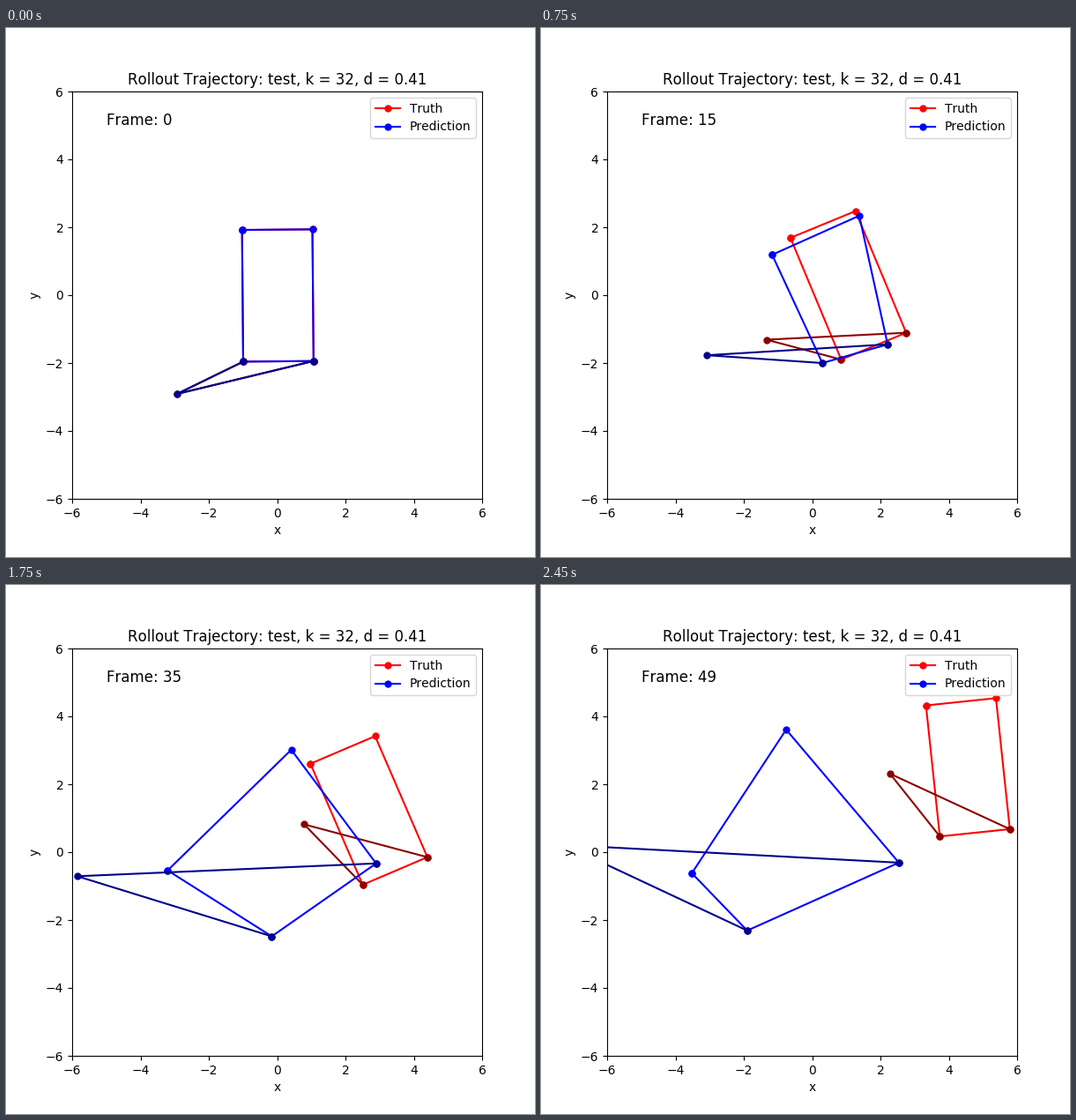
Recreate the animation shown at these times as a matplotlib script. Size 600 px wide and 600 px high, loop 2.5 s.

```python
import numpy as np
import matplotlib.pyplot as plt
from matplotlib.animation import FuncAnimation

plt.rcParams["text.kerning_factor"] = 6

FRAMES = 50
INTERVAL = 50
STEPS = np.arange(FRAMES)
KEYS = np.array([0, 6, 15, 31, 49])

# Joints: top left, top right, bottom right, bottom left, arm tip
BODY = [0, 1, 2, 3, 0]
ARM = [3, 4, 2]
CORNERS = np.array([-1 + 1j, 1 + 1j, 1 - 1j, -1 - 1j])
HALF_WIDTH, HALF_HEIGHT = 1.03, 1.94


def spline(values):
    """Natural cubic spline through complex values at the key steps."""
    def cubes(t):
        return abs(t[:, None] - KEYS) ** 3.0

    def line(t):
        return np.column_stack([np.ones(len(t)), t])

    system = np.block([[cubes(KEYS), line(KEYS)],
                       [line(KEYS).T, np.zeros((2, 2))]])
    weights = np.linalg.solve(system, np.append(values, [0, 0]))
    return np.hstack([cubes(STEPS), line(STEPS)]) @ weights


def truth_paths():
    """A rigid rectangle drifts and tilts while the arm tip moves straight."""
    center = spline([0.02 - 0.01j, 0.5 + 0.15j, 1.06 + 0.29j, 2.25 + 0.94j, 4.56 + 2.5j])
    tilt = np.radians(spline([0.5, 11.5, 22.5, 26, 6]).real)
    box = CORNERS.real * HALF_WIDTH + 1j * CORNERS.imag * HALF_HEIGHT
    body = center[:, None] + np.exp(1j * tilt)[:, None] * box
    tip = np.linspace(-2.93 - 2.91j, 2.28 + 2.31j, FRAMES)
    return np.column_stack([body, tip])


def prediction_paths(start):
    """Each joint leaves the shared start pose along its own curve."""
    later = [
        [-1.05 + 1.79j, -1.17 + 1.19j, -2.9 - 0.34j, -3.52 - 0.62j],
        [1.2 + 2.1j, 1.38 + 2.34j, 0.71 + 2.86j, -0.76 + 3.61j],
        [1.48 - 1.71j, 2.21 - 1.45j, 2.9 - 0.47j, 2.54 - 0.31j],
        [-0.53 - 1.7j, 0.3 - 2j, 0.19 - 2.47j, -1.9 - 2.31j],
        [-2.49 - 2.39j, -3.08 - 1.77j, -5.35 - 0.94j, -7.24 + 0.21j],
    ]
    return np.column_stack([spline([first, *rest])
                            for first, rest in zip(start, later)])


fig, ax = plt.subplots(figsize=(6, 6), dpi=100)
ax.set(xlim=(-6, 6), ylim=(-6, 6), xlabel="x", ylabel="y")
ax.set_title("Rollout Trajectory: test, k = 32, d = 0.41")
counter = ax.text(-5, 5, "", fontsize=12)

truth = truth_paths()
parts = []
for paths, color, label in [
    (truth, "red", "Truth"),
    (prediction_paths(truth[0]), "blue", "Prediction"),
]:
    for joints, shade, name in [(BODY, color, label), (ARM, "dark" + color, None)]:
        line, = ax.plot([], [], "o-", color=shade, ms=5, lw=1.5, label=name)
        parts.append((line, paths[:, joints]))
ax.legend(loc="upper right")


def update(frame):
    for line, path in parts:
        line.set_data(path[frame].real, path[frame].imag)
    counter.set_text(f"Frame: {frame}")
    return [line for line, _ in parts] + [counter]


anim = FuncAnimation(fig, update, frames=FRAMES, interval=INTERVAL,
                     repeat=True, repeat_delay=0)
plt.show()
```
